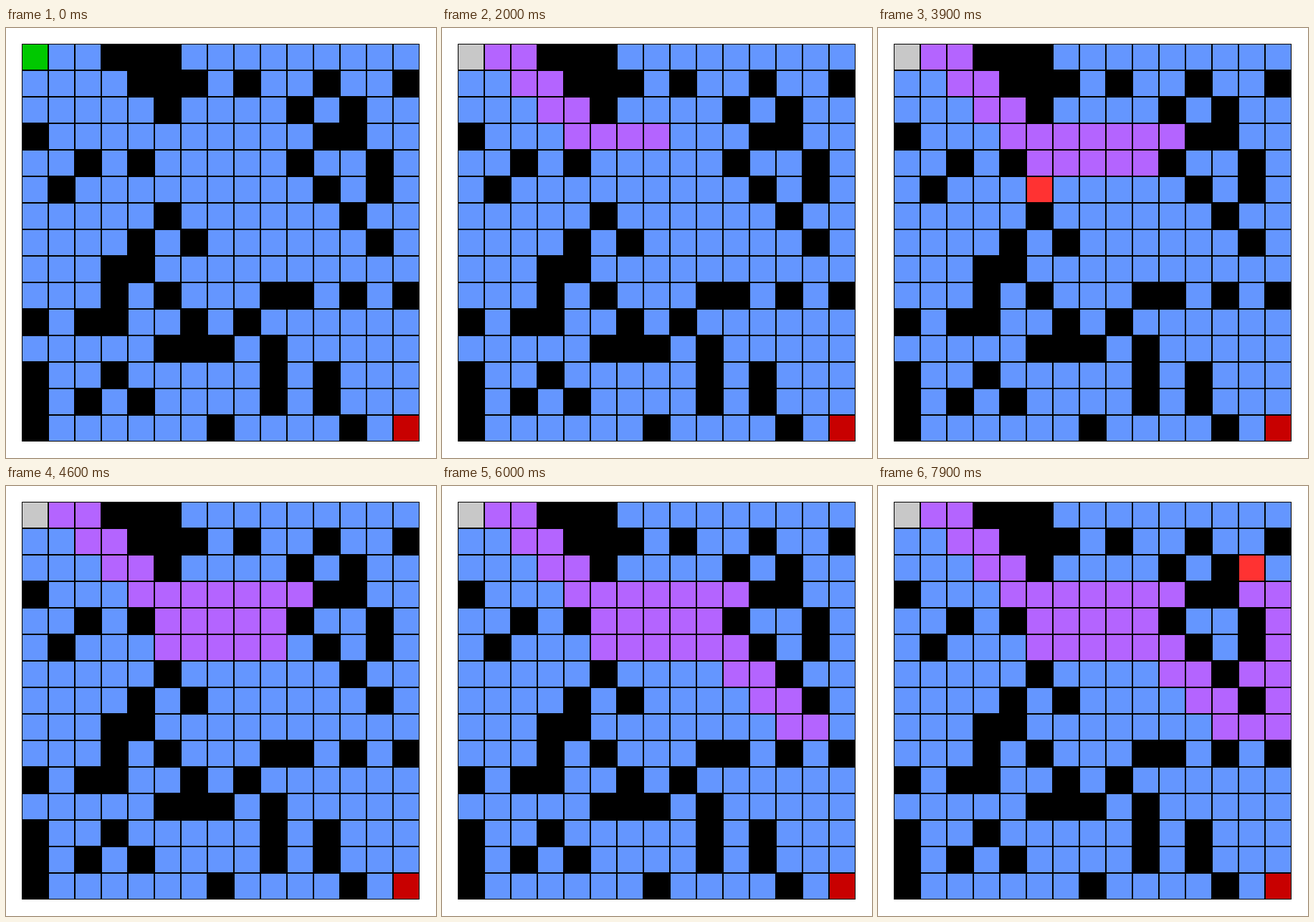
A matplotlib script for the animation above (8 s loop, 600 by 600 pixels).

```python
import matplotlib.pyplot as plt
from matplotlib.animation import FuncAnimation
from matplotlib.patches import Rectangle

SIZE = 600
LEFT, PITCH, FILL = 22, 37, 35
FRAMES, INTERVAL = 80, 100

FREE, SEEN, HEAD = "#6496ff", "#b464ff", "#ff3232"
START, START_SEEN, GOAL = "#00c800", "#c8c8c8", "#c80000"

MAZE = """
...###.........
....###.#..#..#
.....#....#.#..
#..........##..
..#.#.....#..#.
.#.........#.#.
.....#......#..
....#.#......#.
...##..........
...#.#...##.#.#
#.##..#.#......
.....###.#.....
#..#.....#.#...
#.#.#....#.#...
#......#....#..
""".split()
N = len(MAZE)
OPEN = {(c, r) for r in range(N) for c in range(N) if MAZE[r][c] == "."}
FIRST, LAST = (0, 0), (N - 1, N - 1)


def explore(cell, route):
    """Depth-first search: right, left, down, up."""
    route.append(cell)
    for dc, dr in ((1, 0), (-1, 0), (0, 1), (0, -1)):
        step = (cell[0] + dc, cell[1] + dr)
        if step in OPEN and step not in route:
            explore(step, route)
    return route


ROUTE = explore(FIRST, [])

fig = plt.figure(figsize=(SIZE / 100, SIZE / 100), dpi=100, facecolor="white")
ax = fig.add_axes([0, 0, 1, 1])
ax.set_xlim(0, SIZE)
ax.set_ylim(SIZE, 0)
ax.axis("off")


def square(x, y, side, color):
    return ax.add_patch(Rectangle((x, y), side, side, facecolor=color,
                                  linewidth=0, antialiased=False))


square(LEFT, LEFT, N * PITCH, "black")
tiles = {(c, r): square(LEFT + 1 + c * PITCH, LEFT + 1 + r * PITCH, FILL, FREE)
         for c, r in sorted(OPEN)}


def update(n):
    for tile in tiles.values():
        tile.set_facecolor(FREE)
    tiles[LAST].set_facecolor(GOAL)

    # Each cell is first marked as seen, then lit as the head.
    k, lit = divmod(n, 2)
    for cell in ROUTE[:k + 1]:
        tiles[cell].set_facecolor(SEEN)
    tiles[FIRST].set_facecolor(START_SEEN if n else START)
    if lit:
        tiles[ROUTE[k]].set_facecolor(HEAD)
    return list(tiles.values())


anim = FuncAnimation(fig, update, frames=FRAMES, interval=INTERVAL,
                     repeat=True, repeat_delay=0, blit=False)
plt.show()
```
